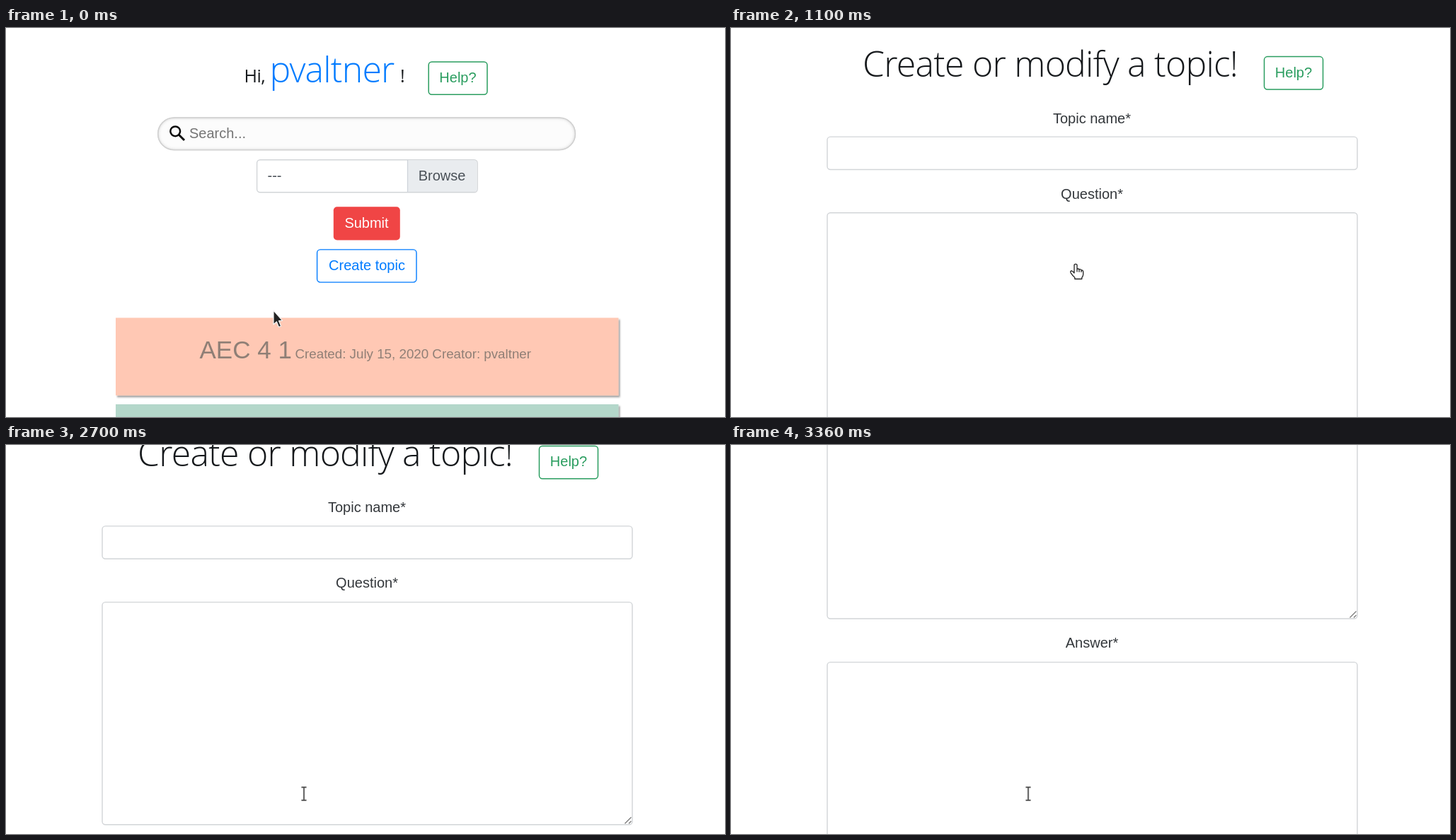
Recreate the animation shown at these times as an HTML page. Size 1016 by 551 pixels, loop 3400 ms.

```html
<!DOCTYPE html>
<html lang="en">
<head>
<meta charset="utf-8">
<title>Create a topic</title>
<style>
  html, body { margin: 0; width: 100%; height: 100%; overflow: hidden; background: #fff; }
  svg { display: block; width: 1016px; height: 551px; }
  text { font: 20px "Liberation Sans", Arial, sans-serif; fill: #33373b; white-space: pre; }
  .mid { text-anchor: middle; }
  .head { font: 345 50px "Open Sans", "Noto Sans", sans-serif; letter-spacing: -.016em; fill: #16191c; }
  .hi { font-size: 25px; font-weight: 400; }
  .user { fill: #007bff; }
  .green { fill: #2a9d5f; }
  .soft { fill: #757575; }
  .ctl { fill: #495057; }
  .card { fill: #8f7f76; }
  .box { fill: #fff; stroke: #d2d5d8; stroke-width: 1.4; }
  .help { fill: #fff; stroke: #2a9d5f; stroke-width: 1.5; }
</style>
</head>
<body>
<svg viewBox="0 0 1016 551">
  <defs>
    <filter id="drop" x="-5%" y="-10%" width="110%" height="125%">
      <feDropShadow dx="2" dy="2.5" stdDeviation="1.3" flood-color="#000" flood-opacity=".38"/>
    </filter>
    <filter id="blur" x="-5%" y="-20%" width="110%" height="140%"><feGaussianBlur stdDeviation="2"/></filter>
    <clipPath id="pill"><rect x="214" y="126.5" width="591" height="46.5" rx="23.2"/></clipPath>
  </defs>
  <rect width="1016" height="551" fill="#fff"/>

  <g id="list">
    <text class="head hi" x="336.5" y="77">Hi,</text>
    <text class="head user" x="372.5" y="76.5">pvaltner</text>
    <text class="head hi" x="557" y="77">!</text>
    <rect class="help" x="597.2" y="47.9" width="82.8" height="46.4" rx="4.5"/>
    <text class="mid green" x="638.5" y="77">Help?</text>

    <rect x="214" y="126.5" width="591" height="46.5" rx="23.2" fill="#fcfcfc"/>
    <g clip-path="url(#pill)">
      <rect x="213" y="125.5" width="593" height="49" rx="24" fill="none" stroke="#aaa" stroke-width="4" opacity=".6" filter="url(#blur)"/>
    </g>
    <rect x="214.7" y="127.1" width="589.8" height="45.6" rx="22.8" fill="none" stroke="#d0d0d0" stroke-width="1.5"/>
    <g fill="none" stroke="#0a0a0a">
      <circle cx="239.2" cy="146.3" r="6.9" stroke-width="2.5"/>
      <path d="M244 151l8 8" stroke-width="3"/>
    </g>
    <text class="soft" x="259" y="156">Search...</text>

    <rect class="box" x="354.6" y="186.8" width="311.6" height="46" rx="4.5"/>
    <path d="M567.5 187.4H661.5q4 0 4 4V228q0 4-4 4H567.5z" fill="#e9ecef"/>
    <path d="M567.5 187V232.5" stroke="#ced4da" stroke-width="1.3"/>
    <text class="ctl" x="369.5" y="216">---</text>
    <text class="mid ctl" x="616" y="216">Browse</text>

    <rect x="462.8" y="253.2" width="94" height="47.2" rx="5" fill="#f04545"/>
    <text class="mid" x="509.5" y="283" style="fill:#fff">Submit</text>

    <rect id="ring" x="437" y="311.6" width="145" height="50.8" rx="7" fill="none" stroke="#007bff" stroke-opacity=".5" stroke-width="4"/>
    <rect id="btn" x="439.6" y="313.9" width="140.4" height="46.2" rx="4.5" stroke="#007bff" stroke-width="1.4"/>
    <text id="label" class="mid" x="510" y="343">Create topic</text>

    <g filter="url(#drop)">
      <rect x="155" y="410.5" width="710.5" height="110" fill="#ffc8b4"/>
      <rect x="155" y="533" width="710.5" height="110" fill="#b4d7ca"/>
    </g>
    <text class="card" x="273.5" y="468" style="font-size:35px">AEC 4 1</text>
    <text class="card" x="408.5" y="468" style="font-size:18.75px">Created: July 15, 2020 Creator: pvaltner</text>
  </g>

  <g id="form">
    <text class="head mid" x="451" y="69">Create or modify a topic!</text>
    <rect class="help" x="753.5" y="40.6" width="83" height="46.4" rx="4.5"/>
    <text class="mid green" x="795" y="69.5">Help?</text>
    <text class="mid" x="510" y="134.6">Topic name*</text>
    <rect class="box" x="136" y="154.1" width="749" height="46.4" rx="4.5"/>
    <text class="mid" x="510" y="241.6">Question*</text>
    <rect class="box" x="136" y="261.8" width="749" height="315.2" rx="4.5"/>
    <path d="M874.5 575.5l9-9M880 575.5l3.5-3.5" stroke="#777" stroke-width="1.2"/>
    <text class="mid" x="510" y="618.3">Answer*</text>
    <rect class="box" x="136" y="638.6" width="749" height="315" rx="4.5"/>
  </g>

  <g id="cursor" stroke-linejoin="round">
    <path id="arrow" d="M0 0V20L4.4 16L7.4 23.5L10.6 22.2L7.5 14.8L12.5 14.3Z" fill="#222" stroke="#f4f4f4" stroke-width="1.2"/>
    <path id="hand" d="M-2 1.5Q0-.8 2 1.5V7.5Q3.5 6.3 5 8Q6.6 7 8 9Q10.5 8.6 10.7 11.5V15Q10.5 18 8.8 19.5V21.5H-1.2V19.5Q-3.8 17.5-7 12.6Q-8 10-5.4 10Q-3.6 11-2 13ZM2 7.5V11.5M5 8V11.8M8 9V12" fill="#fff" stroke="#222" stroke-width="1.3"/>
    <g id="beam" fill="none">
      <path d="M-3.5-9.3H3.5M-3.5 9.3H3.5M0-9.3V9.3" stroke="#e2e2e2" stroke-width="3.4"/>
      <path d="M-3.5-9.3H3.5M-3.5 9.3H3.5M0-9.3V9.3" stroke="#484848" stroke-width="1.5"/>
    </g>
  </g>
</svg>
<script>
const LOOP = 3400, STEP = 20;
const HOVER = 300, CLICK = 760, OPEN = 1100, LEAVE = 1280;

// time, x, y of the pointer's hot spot
const path = [
  [20, 378, 400], [120, 390, 393], [360, 465, 347], [500, 485, 336], [540, 487, 334],
  [1260, 487, 334], [1340, 483, 346], [1660, 451, 436], [1800, 431, 478],
  [1880, 425, 504], [1960, 422, 500], [2040, 421, 494], [3040, 421, 494], [3360, 420, 494]
];

const $ = id => document.getElementById(id);
const part = (t, a, b) => Math.min(1, Math.max(0, (t - a) / (b - a)));
const show = (id, on) => $(id).setAttribute("display", on ? "inline" : "none");
const mix = (from, to, u) =>
  `rgb(${from.map((v, i) => Math.round(v + (to[i] - v) * u)).join()})`;

function pointer(t) {
  let i = 1;
  while (i < path.length - 1 && path[i][0] < t) i++;
  const [a, b] = [path[i - 1], path[i]];
  const u = part(t, a[0], b[0]);
  return [a[1] + (b[1] - a[1]) * u, a[2] + (b[2] - a[2]) * u];
}

// speed up, coast, slow down
function scroll(t) {
  const rest = 1 - part(t, 3040, 3360);
  return 117 * part(t, 2480, 2860) ** 2 + 114 * part(t, 2860, 3040) + 100 * (1 - rest * rest);
}

function draw(t) {
  const white = [255, 255, 255], blue = [0, 123, 255];
  const hover = part(t, HOVER, HOVER + 150);
  show("list", t < OPEN);
  show("form", t >= OPEN);
  $("btn").setAttribute("fill", mix(white, blue, hover));
  $("label").style.fill = mix(blue, white, hover);
  $("ring").setAttribute("opacity", part(t, CLICK, CLICK + 150));
  $("form").setAttribute("transform", `translate(0 ${-scroll(t)})`);
  $("cursor").setAttribute("transform", `translate(${pointer(t)})`);
  show("arrow", t < HOVER);
  show("hand", t >= HOVER && t < LEAVE);
  show("beam", t >= LEAVE);
}

const start = performance.now();
function tick() {
  const t = (performance.now() - start) % LOOP;
  draw(Math.min(LOOP - 2 * STEP, Math.floor(t / STEP) * STEP));
  requestAnimationFrame(tick);
}
tick();
</script>
</body>
</html>
```
